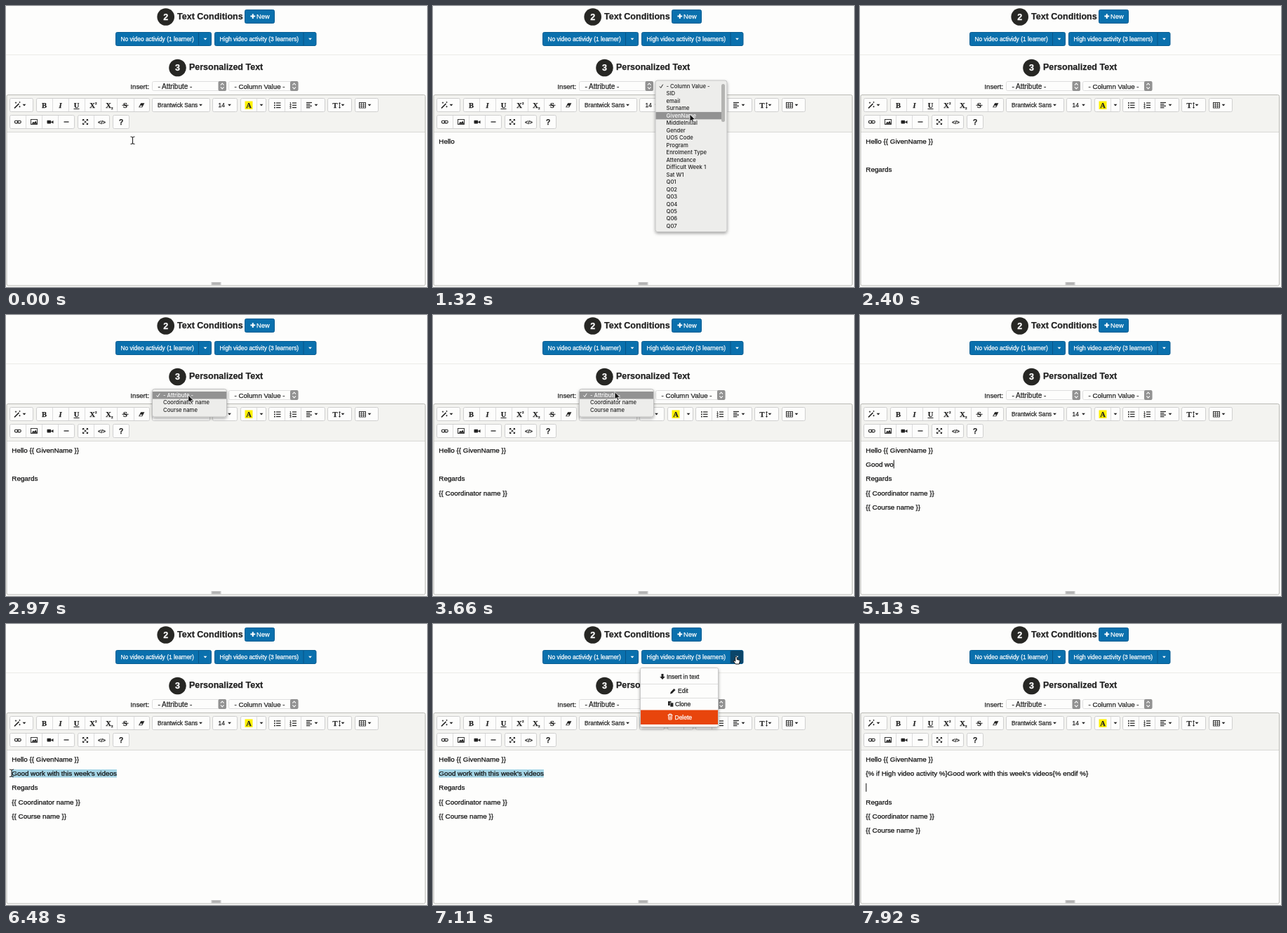
Animation, 600 px wide and 400 px high, one loop 8 s. Source, as an HTML page:

```html
<!DOCTYPE html>
<html lang="en">
<head>
<meta charset="utf-8">
<title>Personalized text editor</title>
<style>
  html, body { margin: 0; width: 100%; height: 100%; overflow: hidden; background: #fdfdfc; }
  svg { display: block; width: 600px; height: 400px; }
  text { font-family: "Liberation Sans", Arial, sans-serif; white-space: pre; stroke-width: .25px; }
  .serif { font-family: "Liberation Serif", serif; font-weight: bold; }
  .menu { font-family: Inter, sans-serif; font-size: 7.7px; font-weight: 500; }
  .line { font-size: 9.85px; fill: #111; stroke: #111; }
</style>
</head>
<body>
<svg id="stage" viewBox="0 0 600 400" xmlns="http://www.w3.org/2000/svg"></svg>
<script>
const PAGE = '#fdfdfc', INK = '#222', BLUE = '#0a70ad', POP = '#ededeb', LINE = '#cfcfcf';
const LOOP = 8000;

// Markup helpers
const rect = (x, y, w, h, fill, more = '') =>
  `<rect x="${x}" y="${y}" width="${w}" height="${h}" fill="${fill}" ${more}/>`;
const text = (x, y, size, str, more = '', color = INK) =>
  `<text x="${x}" y="${y}" font-size="${size}" fill="${color}" stroke="${color}" ${more}>${str}</text>`;
const path = (d, fill = INK, more = '') => `<path d="${d}" fill="${fill}" ${more}/>`;
const stroke = (d, width = 1, color = INK) =>
  path(d, 'none', `stroke="${color}" stroke-width="${width}"`);
const tri = (x, y, fill = INK) => path(`M${x - 2.4} ${y - 1.2}h4.8l-2.4 2.8z`, fill);
const mid = 'text-anchor="middle"';
const bold = 'font-weight="bold"';
const edge = (color, r = 2) => `stroke="${color}" stroke-width="1" rx="${r}"`;

function step(x, y, n, title) {
  return `<circle cx="${x}" cy="${y}" r="12.3" fill="#272724"/>` +
    text(x, y + 4.4, 12.5, n, `${bold} ${mid}`, '#fff') +
    text(x + 16.4, y + 3.3, 12.5, title, bold);
}

function condition(x, w, label) {
  return rect(x + .5, 37.5, w - 1, 19, BLUE, edge('#085d92')) +
    text(x + 7.5, 50, 8.4, label, '', '#fff') +
    stroke(`M${x + w - 18.5} 38v18`, 1, '#075587') + tri(x + w - 9, 47, '#fff');
}

function select(x, w, size, label) {
  const s = x + w - 11.5;
  return rect(x + .5, 107.5, w - 1, 13, PAGE, edge('#dedede')) +
    text(x + 8.5, 117.6, size, label) +
    rect(s, 107, 11.5, 14, '#929292', 'rx="2"') +
    stroke(`M${s + 3.4} 112.6l2.3-2.6 2.3 2.6M${s + 3.4} 115.4l2.3 2.6 2.3-2.6`, 1.1, '#fff');
}

// A button group with inner dividers
function group(x, y, w, ...dividers) {
  return rect(x + .5, y + .5, w - 1, 19, PAGE, edge(LINE)) +
    dividers.map(d => stroke(`M${d + .5} ${y + 1}v18`, 1, '#dcdcdc')).join('');
}

const rows = (x, y, widths, gap = 2.4) =>
  widths.map((w, i) => stroke(`M${x} ${y + i * gap}h${w}`, 1.2)).join('');
const glyph = (x, str, more = '') => text(x, 144.8, 10.5, str, `class="serif" ${mid} ${more}`);

function toolbar() {
  const top = group(5, 131, 34) + group(43, 131, 162, 66, 89, 112, 135, 158, 182) +
    group(208, 131, 83) + group(294, 131, 36) + group(334, 131, 37, 357) +
    group(374, 131, 81, 397, 420) + group(458, 131, 35) + group(497, 131, 34);
  const bottom = group(5, 155, 93, 28, 51, 74) + group(102, 155, 46, 125) + group(152, 155, 24);
  const wand = stroke('M12 145.5l6.5-6.5', 1.7) +
    stroke('M14 136.5v2.4M12.8 137.7h2.4M19.5 142v2.4M18.3 143.2h2.4M19.5 136v2M18.5 137h2', .8);
  const letters = glyph(54.5, 'B') + glyph(77.5, 'I', 'font-style="italic"') +
    glyph(100.5, 'U') + stroke('M96.5 146.5h8', 1) +
    glyph(123, 'X') + text(127, 140, 5, '2', 'class="serif"') +
    glyph(146, 'X') + text(150, 147, 5, '2', 'class="serif"') +
    glyph(170, 'S') + stroke('M165.5 141.3h9', 1);
  const eraser = path('M189 144.2l3.2-6h5.2l-3.2 6z') +
    path('M190.4 143.5l.9-1.7h3l-.9 1.7z', PAGE);
  const color = rect(340.5, 135.5, 11, 11.5, '#fff200') + glyph(346, 'A');
  const lists = [138, 141.3, 144.6].map((y, i) =>
    rect(382, y - .8, 1.7, 1.7, INK) + stroke(`M385 ${y}h6.5`, 1.2) +
    text(404.5, y + 1.6, 3.6, i + 1) + stroke(`M408 ${y}h6`, 1.2)).join('');
  const height = glyph(469, 'T') + stroke('M475.5 138v7', .9) +
    path('M474 139l1.5-2 1.5 2zM474 144l1.5 2 1.5-2z');
  const table = rect(503.5, 137.5, 9, 7.5, 'none', `stroke="${INK}" stroke-width=".9"`) +
    stroke('M504 140h8M504 142.5h8M506.5 138v7M509.5 138v7', .7);
  const link = [12.3, 16.3].map(x =>
    rect(x, 163.3, 5, 3.6, 'none', `stroke="${INK}" stroke-width="1.1" rx="1.8"`)).join('');
  const image = rect(35.5, 161.5, 9, 7, 'none', `stroke="${INK}" stroke-width=".9"`) +
    path('M36.5 167.7l2.3-3 1.5 1.4 2-2.5 2 4.1z');
  const video = rect(58.5, 162.8, 5.6, 4.8, INK, 'rx=".8"') + path('M63.8 165.2l3.7-2.2v4.4z');
  const full = stroke('M110.3 162.3l5.4 5.4M115.7 162.3l-5.4 5.4', .9) +
    path('M109 161h3l-3 3zM117 161h-3l3 3zM109 169h3l-3-3zM117 169h-3l3-3z');
  return top + bottom + wand + letters + eraser + color + lists + height + table +
    rows(428, 137.5, [8, 5.5, 8, 5.5]) + link + image + video + stroke('M82.5 165h7', 1.3) + full +
    text(136.5, 168, 7.6, '&lt;/&gt;', `${mid} ${bold}`) + text(164, 168.7, 10.2, '?', `${mid} ${bold}`) +
    text(216, 144, 8.3, 'Brantwick Sans') + text(302.5, 144, 8.4, '14') +
    [26, 277.5, 318.5, 364, 442, 480, 518].map(x => tri(x, 141)).join('');
}

// Native select list: the grey bar marks the hovered row
const ROW = 10.47, ROW_TOP = 109;
function popup(id, x, y, w, h, items, scroll) {
  return `<g id="${id}">` +
    rect(x, y, w, h, POP, 'rx="3" stroke="#b9b9b9" stroke-width=".8" filter="url(#shade)"') +
    `<rect class="bar" x="${x + .5}" width="${w - (scroll ? 8 : 1)}" height="${ROW}" fill="#929292"/>` +
    (scroll ? rect(x + 94, 111, 5, 54, '#b4b4b2', 'rx="2.5"') : '') +
    `<path class="tick" d="M${x + 6} 114.5l1.700 2 3-4.800" fill="none"/>` +
    items.map((s, i) => `<text class="menu" x="${x + 15.5}" y="${117 + i * ROW}">${s}</text>`).join('') +
    '</g>';
}

function conditionMenu() {
  return '<g id="menu">' + rect(424, 38, 18, 18, '#0b4569', 'rx="1.5"') + tri(433, 47, '#fff') +
    rect(295.5, 62.5, 111, 84, PAGE, 'stroke="#c9c9c9" rx="2" filter="url(#shade)"') +
    rect(296, 66, 110, 19, '#f0f0ee', 'id="hover"') +
    stroke('M296 85.5h110M296 105.5h110', 1, '#dedede') +
    rect(296, 122.5, 110, 20.5, '#e8450c') +
    path('M325.5 71h3v4h2.300l-3.800 4-3.800-4h2.300z') + text(333, 78, 8.5, 'Insert in text') +
    path('M338 99.5l.8-2.700 4.700-4.700 2 2-4.700 4.700z') + text(349, 98.3, 8.5, 'Edit') +
    rect(335, 110, 4.5, 6, INK) + rect(338, 112, 4.8, 6, INK, `stroke="${PAGE}" stroke-width=".6"`) +
    text(345, 117, 8.5, 'Clone') +
    stroke('M334.5 129.5h7M336.5 129v-1h3v1M335.5 130l.4 6h4.200l.4-6M337.200 131v4M338.900 131v4', .9, '#fff') +
    text(344.5, 135.7, 8.5, 'Delete', '', '#fff') + '</g>';
}

const columns = ['- Column Value -', 'SID', 'email', 'Surname', 'GivenName', 'MiddleInitial', 'Gender',
  'UOS Code', 'Program', 'Enrolment Type', 'Attendance', 'Difficult Week 1', 'Sat W1',
  ...Array.from({ length: 7 }, (_, i) => `Q0${i + 1}`)];
const attributes = ['- Attribute -', 'Coordinator name', 'Course name'];

document.getElementById('stage').innerHTML =
  '<defs><filter id="shade" x="-20%" y="-20%" width="140%" height="150%">' +
  '<feDropShadow dx="0" dy="2" stdDeviation="2" flood-opacity=".35"/></filter></defs>' +
  rect(0, 0, 600, 400, PAGE) +
  step(227.7, 15.5, 2, 'Text Conditions') + step(244.5, 88, 3, 'Personalized Text') +
  rect(340.5, 5.5, 42, 19, BLUE, edge('#085d92')) +
  stroke('M351.8 11.2v6.800M348.400 14.600h6.800', 2, '#fff') +
  text(357, 17.8, 9.3, 'New', '', '#fff') +
  condition(156, 137, 'No video actividy (1 learner)') +
  condition(297, 145.5, 'High video activity (3 learners)') +
  stroke('M0 69.5h600', 1, '#ebebe8') +
  text(177.3, 117.8, 9.7, 'Insert:') +
  select(208, 106, 10, attributes[0]) + select(317, 99.5, 9.7, columns[0]) +
  rect(1, 127, 597, 52, '#f3f3f0') + stroke('M1 179.5h597', 1, '#d8d8d6') +
  rect(1, 126.5, 596.5, 271.5, 'none', edge('#b9b9b4')) +
  toolbar() +
  rect(292.5, 393, 14, 4.5, '#c8c8c8') + stroke('M294 394.5h11M294 396.200h11', .6, '#939393') +
  rect(8, 207, 0, 11.5, '#a5d5e6', 'id="sel"') +
  Array.from({ length: 6 }, () => '<text class="line" x="8.3"></text>').join('') +
  rect(8, 0, 1, 12, '#111', 'id="caret"') +
  popup('cols', 317, 106, 102, 215.5, columns, true) +
  popup('attrs', 208.5, 105.5, 106, 39.5, attributes, false) + conditionMenu() +
  '<g id="mouse">' +
  path('M0 0v10.5l2.500-2.200 1.700 4 1.800-.8-1.700-3.800h3.400z', '#111', 'stroke="#fff" stroke-width=".8"') +
  stroke('M-3-5q2.5 0 3 1.200q.5-1.200 3-1.200M0-4v8.5M-3 5.5q2.500 0 3-1.200q.5 1.200 3 1.200', 1.1) +
  path('M-1.2 0q1.200-1.400 2.400 0v3.500l3.300.8q1 .4.800 1.700l-.9 4h-5.200l-3-4q0-1.400 1.400-.8l1.200 1z', '#fff',
    'stroke="#111" stroke-width="1"') + '</g>';

const $ = id => document.getElementById(id);
const lineEls = [...document.querySelectorAll('.line')];
const sel = $('sel'), caret = $('caret'), mouse = $('mouse');
const show = (el, on) => el.setAttribute('visibility', on ? 'visible' : 'hidden');
const within = (t, spans) => spans.some(([a, b]) => t >= a && t < b);
const typed = (str, t, start, pace) => str.slice(0, Math.max(0, Math.floor((t - start) / pace)));

// Pointer stops: time, x, y
const stops = [[0, 180.5, 191], [480, 180.5, 191], [780, 367, 112], [960, 367, 112], [1290, 366, 154],
  [1440, 366, 154], [1650, 300, 200], [2490, 300, 200], [2760, 260, 112], [2940, 260, 112], [3060, 258, 124],
  [3150, 258, 124], [3420, 257, 130], [3570, 259, 109.5], [3720, 259, 109.5], [3840, 257, 134],
  [3930, 257, 134], [4560, 120, 212], [6060, 120, 212], [6180, 161, 212], [6420, 8, 212], [6480, 8, 212],
  [6840, 432, 47], [7140, 432, 47], [7350, 352, 76], [7440, 352, 76], [7680, 333, 212], [LOOP, 333, 212]];
const hidden = [[120, 480], [1680, 2490], [3270, 3360], [4800, 6060], [7740, LOOP]];

function pointer(t) {
  const i = stops.findIndex(s => s[0] > t);
  const [t0, x0, y0] = stops[i - 1], [t1, x1, y1] = stops[i];
  const p = (t - t0) / (t1 - t0), e = p * p * (3 - 2 * p);
  return [x0 + (x1 - x0) * e, y0 + (y1 - y0) * e];
}

function lines(t) {
  const first = t < 1470 ? typed('Hello ', t, 120, 55) : 'Hello {{ GivenName }}';
  const praise = typed("Good work with this week's videos", t, 4860, 36);
  const out = [first, t < 7410 ? praise : `{% if High video activity %}${praise}{% endif %}`];
  if (t >= 7740) out.push('');
  out.push(typed('Regards', t, 1950, 50),
    t < 3150 ? '' : '{{ Coordinator name }}', t < 3900 ? '' : '{{ Course name }}');
  return out;
}

// Caret: from, to, line
const carets = [[90, 780, 0], [1470, 1710, 0], [1710, 1830, 1], [1830, 2370, 2], [2430, 2730, 3],
  [3150, 3270, 3], [3270, 3540, 4], [3900, 4170, 4], [4590, 6150, 1], [7440, 7740, 1], [7740, LOOP, 2]];

function list(id, on, y, count) {
  const g = $(id), row = Math.max(0, Math.min(count - 1, Math.floor((y - ROW_TOP) / ROW)));
  show(g, on);
  if (!on) return;
  g.querySelector('.bar').setAttribute('y', ROW_TOP + row * ROW);
  g.querySelector('.tick').setAttribute('stroke', row ? INK : '#fff');
  g.querySelectorAll('text').forEach((el, i) => el.setAttribute('fill', i === row ? '#fff' : INK));
}

function draw(t) {
  const [x, y] = pointer(t);
  lines(t).concat('').slice(0, 6).forEach((s, i) => {
    lineEls[i].setAttribute('y', 195.5 + i * 20.35);
    if (lineEls[i].textContent !== s) lineEls[i].textContent = s;
  });

  const c = carets.find(([a, b]) => t >= a && t < b);
  show(caret, c);
  if (c) {
    const el = lineEls[c[2]];
    caret.setAttribute('x', 8.3 + (el.textContent ? el.getComputedTextLength() : 0));
    caret.setAttribute('y', 186 + c[2] * 20.35);
  }

  const selecting = t >= 6180 && t < 7410;
  show(sel, selecting);
  if (selecting) {
    const end = 8.3 + lineEls[1].getComputedTextLength();
    const from = t < 6450 ? Math.min(end, Math.max(8, x)) : 8;
    sel.setAttribute('x', from);
    sel.setAttribute('width', end - from);
  }

  const colsOpen = within(t, [[840, 1470]]);
  const attrsOpen = within(t, [[2820, 3150], [3600, 3900]]);
  const menuOpen = within(t, [[6900, 7410]]);
  list('cols', colsOpen, y, columns.length);
  list('attrs', attrsOpen, y, attributes.length);
  show($('menu'), menuOpen);
  show($('hover'), menuOpen && y > 66 && x < 406);

  const onButton = y > 37 && y < 57 && x > 297 && x < 442;
  const kind = y > 180 ? 1 : onButton || (menuOpen && y > 62 && x < 406) ? 2 : 0;
  const seen = !within(t, hidden);
  [...mouse.children].forEach((el, i) => show(el, seen && i === kind));
  mouse.setAttribute('transform', `translate(${x.toFixed(2)} ${y.toFixed(2)})`);
}

const begin = performance.now();
function tick() {
  draw((performance.now() - begin) % LOOP);
  requestAnimationFrame(tick);
}
tick();
</script>
</body>
</html>
```
